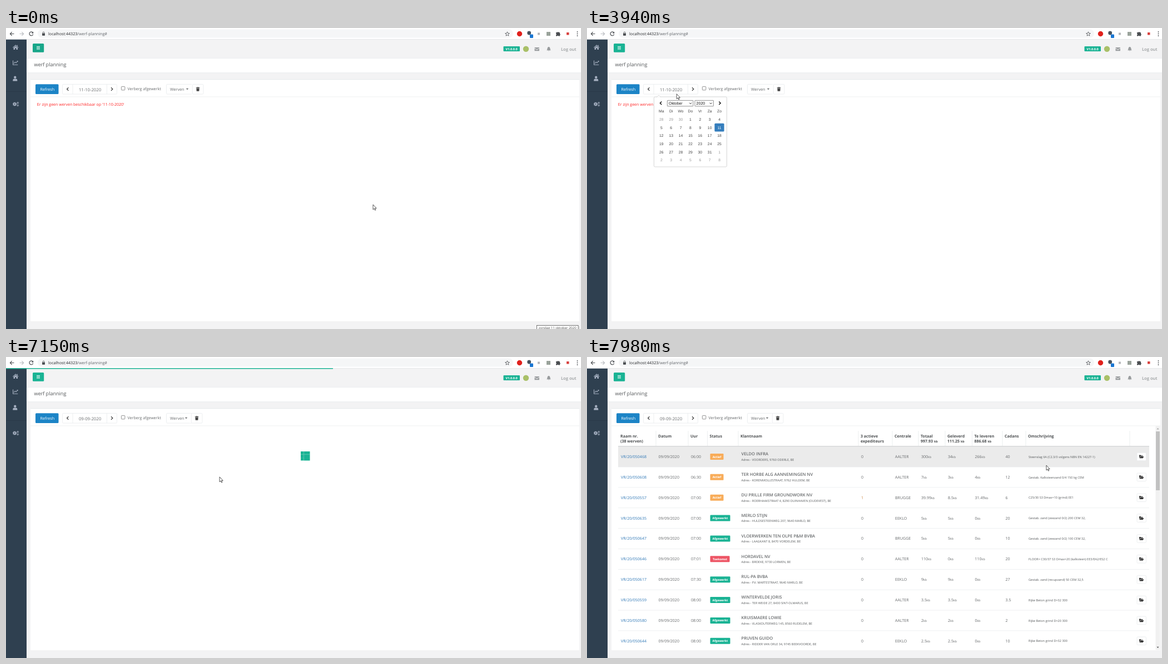
An HTML page that plays this animation: 1034 px wide and 542 px high, repeating every 8 s.

```html
<!DOCTYPE html>
<html lang="nl">
<head>
<meta charset="utf-8">
<title>werf planning</title>
<style>
html, body { margin: 0; width: 100%; height: 100%; overflow: hidden; background: #f3f3f4 }
svg { display: block; width: 1034px; height: 542px; font-family: "Open Sans", sans-serif; text-rendering: geometricPrecision }
.arial { font-family: "Liberation Sans", Arial, sans-serif }
</style>
</head>
<body>
<svg id="stage" viewBox="0 0 1034 542"></svg>
<script>
const LOOP = 8000, OPEN = 3510, PREV = 4680, PICK = 5760, SPIN = 5804, LOADED = 7250;
const GREEN = '#1ab394', LINE = '#e7eaec', GRAY = '#676a6c';
const ROW_TOP = 161.2, ROW_H = 36.86;

const text = (x, y, s, size = 7.05, fill = GRAY, more = '') =>
  `<text x="${x}" y="${y}" font-size="${size}" fill="${fill}" ${more}>${s}</text>`;
const rect = (x, y, w, h, fill, more = '') =>
  `<rect x="${x}" y="${y}" width="${w}" height="${h}" fill="${fill}" ${more}/>`;
const path = (d, fill, more = '') => `<path d="${d}" fill="${fill}" ${more}/>`;
const line = (d, stroke, width = 1) => path(d, 'none', `stroke="${stroke}" stroke-width="${width}"`);
const circle = (x, y, r, fill) => `<circle cx="${x}" cy="${y}" r="${r}" fill="${fill}"/>`;
const group = (id, body, more = '') => `<g id="${id}" ${more}>${body}</g>`;
const bordered = (x, y, w, h, color = LINE, rx = 1.5) =>
  rect(x, y, w, h, '#fff', `stroke="${color}" stroke-width=".8" rx="${rx}"`);
const BOLD = 'font-weight="700"', SEMI = 'font-weight="600"', MID = 'text-anchor="middle"';

function browserBar() {
  const dark = '#4a4d51';
  return rect(0, 0, 1034, 20, '#fff') + rect(57, 2.5, 855, 15, '#f5f6f7', 'rx="7.5"') +
    rect(0, 20, 1034, .8, '#e4e5e6') +
    line('M14.5 10.5H7.5M10.7 7.2L7.4 10.5L10.7 13.8', dark, 1.2) +
    line('M24.5 10.5H31.5M28.3 7.2L31.6 10.5L28.3 13.8', '#b9bcc0', 1.2) +
    line('M48 8.1A3.4 3.4 0 1 0 48.7 11.3', dark, 1.2) + path('M49.2 6.4V9.8H45.8Z', dark) +
    rect(65, 9.5, 5, 4.2, dark, 'rx=".6"') + line('M66 9.8V8.5A1.4 1.4 0 0 1 69 8.5V9.8', dark, .8) +
    text(76, 13, '<tspan fill="#26282b">localhost:44323</tspan>/werf-planning#', 7.16, '#606469') +
    line('M901.5 6.8L902.6 9.4L905.4 9.6L903.2 11.4L903.9 14.1L901.5 12.6L899.1 14.1L899.8 11.4L897.6 9.6L900.4 9.4Z', dark, .8) +
    circle(923.5, 10.5, 4.7, '#e0201c') +
    circle(940.7, 9, 3.4, '#46535f') + rect(942, 11.5, 6, 6.5, '#1976d2', 'rx="1"') +
    rect(956, 8.5, 4, 4, '#b5b7ba') + rect(972, 7, 7, 7, '#9aa39b') +
    path('M989 8H991.4A1.4 1.4 0 0 1 994 8H996V10.4A1.4 1.4 0 0 1 996 13V14.6H993.6A1.3 1.3 0 0 0 991.2 14.6H989V12.4A1.3 1.3 0 0 0 989 10Z', dark) +
    rect(1008, 8, 4.5, 4.5, '#d8423f') +
    [7, 10.5, 14].map(y => circle(1027.5, y, .9, dark)).join('');
}

function sidebar() {
  const c = '#a7b1c2';
  const gear = (x, y, r) =>
    `<circle cx="${x}" cy="${y}" r="${r}" fill="none" stroke="${c}" stroke-width="${r}"/>` +
    `<circle cx="${x}" cy="${y}" r="${r * 1.6}" fill="none" stroke="${c}" stroke-width="${r * .6}" stroke-dasharray="${r * .63}"/>`;
  return rect(0, 20.8, 37, 522, '#2f4050') + rect(0, 114, 37, .8, '#283746') +
    path('M12 35L17.3 30.3L22.6 35L21.9 35.7L17.3 31.7L12.7 35.7ZM13.6 35.7L17.3 32.5L21 35.7V39H18.5V36.3H16.1V39H13.6ZM19.8 30.8H21V33L19.8 32Z', c) +
    line('M12.6 58.5V66.3H21.3M14 63.8L16.3 61.2L18 62.8L20.8 59.8', c, 1.1) +
    path('M19.2 58.9H21.5V61.2Z', c) +
    circle(16.3, 88.8, 2.2, c) + path('M12.3 95.6V94Q12.3 91.6 14.8 91.6H17.8Q20.3 91.6 20.3 94V95.6Z', c) +
    gear(15.6, 137, 1.9) + gear(21.2, 134.8, 1) + gear(21.2, 139.4, 1);
}

function page() {
  const c = '#999c9e';
  return rect(0, 20, 1034, 522, '#f3f3f4') + browserBar() + sidebar() +
    `<rect id="menu" x="48" y="28" width="20.2" height="15.8" rx="1.5"/>` +
    line('M55 33.6H61M55 35.8H61M55 38H61', '#fff', 1) +
    rect(894.5, 33, 29.5, 9, GREEN, 'rx="1"') + text(909.2, 39.6, 'V1.0.0.0', 5.6, '#fff', BOLD + MID) +
    circle(935, 37.7, 5.2, '#a9c068') +
    path('M950.5 35H959V36L954.7 38.6L950.5 36ZM950.5 37L954.7 39.6L959 37V41.2H950.5Z', c) +
    path('M976 33.8Q973.4 34.6 973.4 37.2Q973.4 39 972.3 40.2H979.7Q978.6 39 978.6 37.2Q978.6 34.6 976 33.8ZM974.9 40.8H977.1Q976 42.3 974.9 40.8Z', c) +
    text(998, 40.7, 'Log out', 7.6, c, SEMI) +
    rect(37, 54.3, 997, 26.3, '#fff') + rect(37, 54, 997, .7, LINE) + rect(37, 80.4, 997, .8, LINE) +
    text(50.4, 69, 'werf planning', 9.05, '#55585a') +
    rect(44, 92, 987, 436, '#fff') + rect(44, 92, 987, 1.2, LINE) + rect(44, 123.6, 987, .7, LINE) +
    rect(53, 101.3, 41.5, 17.8, '#1c84c6', 'rx="1.5"') + text(74.3, 112.8, 'Refresh', 7.2, '#fff', MID) +
    bordered(101.4, 101.4, 98, 17.6) + line('M120 101V119M181.4 101V119', LINE, .8) +
    line('M112.4 107.2L109.6 110L112.4 112.8M189 107.2L191.8 110L189 112.8', '#333', 1.2) +
    `<text id="date" x="151" y="114.2" font-size="7.7" fill="${GRAY}" text-anchor="middle"></text>` +
    bordered(207.4, 105.4, 6.4, 6.4, '#767676', 1) + text(218.5, 112.4, 'Verberg afgewerkt') +
    bordered(288.5, 101.4, 46, 17.6) + text(295, 112.8, 'Werven', 7.2);
}

// The caret, divider and bin after "Werven" shift left once the list is refreshed.
function binButton() {
  return rect(332, 101.8, 3.6, 16.8, '#fff') + bordered(335.3, 101.4, 19.6, 17.6) +
    path('M323.8 108.8H328.2L326 111.2Z', GRAY) +
    path('M341.8 107H344L344.4 106.3H346L346.4 107H348.2V108H341.8ZM342.3 108.5H347.7L347.3 113.8H342.7Z', '#444');
}

const TABLE_ROWS = `
050468|06:00|Actief|VELDO INFRA|VOORDERS, 9760 ODERLE|0|AALTER|300|34|266|40|Steenslag IIA (C2.3/3 volgens NBN EN 14227-1)
050608|06:30|Actief|TER HORBE ALG AANNEMINGEN NV|KORENMOLLESTRAAT, 9762 HULDEM|0|AALTER|7|3|4|12|Gestab. Kalksteenzand 0/4 150 kg CEM
050557|07:00|Actief|DU PRILLE FIRM GROUNDWORK NV|ROERHAAKSTRAAT 4, 8290 DUINHAVEN (OUDEVEST)|1|BRUGGE|39.99|8.5|31.49|6|C25/30 S3 Dmax=10 (grind) EE1
050635|07:00|Afgewerkt|MERLO STIJN|HULDSESTEENWEG 207, 9640 MARLO|0|EEKLO|5|5|0|20|Gestab. zand (zeezand 0/2) 200 CEM 32,
050647|07:00|Afgewerkt|VLOERWERKEN TEN OLPE P&amp;M BVBA|LAAGKANT 8, 8470 VORDELEM|0|BRUGGE|5|5|0|10|Gestab. zand (zeezand 0/2) 100 CEM 32,
050646|07:01|Toekomst|HORDAVEL NV|BROEKE, 9730 LORMEN|0|AALTER|110|0|110|20|FLOOR+ C30/37 S3 Dmax=20 (kalksteen) EE3/EA2/ES2 C
050617|07:30|Afgewerkt|RUL-PA BVBA|P.V. MARTESTRAAT, 9640 MARLO|0|EEKLO|9|9|0|27|Gestab. zand (recupzand) 50 CEM 32,5
050559|08:00|Afgewerkt|WINTERVELDE JORIS|TER WEIDE 27, 8430 SINT-OLMARUS|0|AALTER|3.5|3.5|0|3.5|Rijke Beton grind D=32 300
050580|08:00|Afgewerkt|KRUISMAERE LOWIE|VLASKOUTERWEG 145, 8560 RUDELEM|0|AALTER|2|2|0|2|Rijke Beton grind D=20 300
050644|08:00|Afgewerkt|PRUVEN GUIDO|RIDDER VAN ORLE 34, 9745 BEEKVOORDE|0|EEKLO|2.5|2.5|0|10|Rijke Beton grind D=32 300`
  .trim().split('\n').map(row => row.split('|'));

const BADGES = { Actief: ['#f8ac59', 24], Afgewerkt: [GREEN, 36], Toekomst: ['#ed5565', 35] };
const kb = '<tspan font-size="5.4">kb</tspan>';

function tableRow([nr, time, status, name, address, senders, plant, total, done, left, pace, note], i) {
  const mid = ROW_TOP + ROW_H * i + 18.3, base = mid + 2.5;
  const [color, width] = BADGES[status];
  const cells = [[128.5, '09/09/2020'], [187, time], [554, plant], [601, total + kb], [649, done + kb], [697.5, left + kb], [752.5, pace]];
  return rect(56, ROW_TOP + ROW_H * (i + 1) - .4, 955, .7, LINE) +
    text(61, base, 'VR/20/' + nr, 7.05, '#337ab7') +
    cells.map(([x, s]) => text(x, base, s)).join('') +
    rect(221.5, mid - 5.5, width, 11, color, 'rx="1.2"') +
    text(221.5 + width / 2, mid + 2, status, 5.4, '#fff', BOLD + MID) +
    text(277.5, mid - 2.3, name, 7.55, GRAY, SEMI) +
    text(277.5, mid + 7.4, `Adres - ${address}, BE`, 5.5, '#55585a') +
    text(493, base, senders, 7.05, senders > 0 ? '#c9803a' : GRAY) +
    text(794, mid + 2.2, note, 5.55, '#55585a') +
    bordered(989, mid - 7.3, 16.4, 14.6) +
    path(`M993 ${mid + 2.4}v-5.4h2.6l.8 .9h3.2v1.4h-4.8zM993.5 ${mid + 2.8}l1.7 -3h6.2l-1.7 3z`, '#333');
}

function table() {
  const heads = [[60, 'Raam nr.', '(38 werven)'], [128, 'Datum'], [186, 'Uur'], [220.5, 'Status'], [276, 'Klantnaam'],
    [492, '3 actieve', 'expediteurs'], [553, 'Centrale'], [600, 'Totaal', '997.93 ' + kb], [648, 'Geleverd', '111.25 ' + kb],
    [696.5, 'Te leveren', '886.68 ' + kb], [751, 'Cadans'], [793, 'Omschrijving'], [980, '']];
  return `<rect id="hover" x="56" width="955" height="${ROW_H}" fill="#ebebeb"/>` +
    heads.map(([x, a, b = ''], i) => text(x, 144.6, a, 7.05, '#4c4f51', BOLD) + text(x, 154, b, 7.05, '#4c4f51', BOLD) +
      (i ? rect(x - 4.4, 133, .8, 27, LINE) : '')).join('') +
    rect(56, 160, 955, 1.5, '#d6d8d9') +
    TABLE_ROWS.map(tableRow).join('') +
    rect(44, 528, 990, 14, '#f3f3f4') +
    rect(1022.5, 124.3, 8, 403, '#f1f1f1') + rect(1023, 134, 7, 106, '#c1c1c1') +
    path('M1024.5 130.3H1028.5L1026.5 128Z', '#a3a3a3') + path('M1024.5 521.8H1028.5L1026.5 524Z', '#505050');
}

const CELL_X = 133.8, CELL_Y = 164.5, CELL_W = 17.37, CELL_H = 14.65;

function month(name, index, lead) {
  let out = text(147, 137.8, name, 6.95, '#111');
  for (let i = 0; i < 42; i++) {
    const day = new Date(2020, index, 1 - lead + i);
    const x = CELL_X + i % 7 * CELL_W, y = CELL_Y + Math.floor(i / 7) * CELL_H;
    const inside = day.getMonth() === index, active = inside && index === 9 && day.getDate() === 11;
    if (active) out += rect(x - 8.6, y - 7.3, 17.2, 14.6, '#357ebd', 'rx="1.5"');
    out += text(x, y + 2.4, day.getDate(), 6.8, active ? '#fff' : inside ? '#444' : '#999', MID);
  }
  return out;
}

function calendar() {
  const select = (x, w) => bordered(x, 130.4, w, 10.4, '#767676', .5) +
    line(`M${x + w - 6.6} 134.7l1.9 2l1.9 -2`, '#222', 1);
  return bordered(120.4, 124, 131, 126, '#ccc', 2) +
    path('M125.4 124.4L129 121L132.6 124.4', '#fff', 'stroke="#ccc" stroke-width=".7"') +
    rect(125, 128, 16, 14.2, '#eee', 'id="prevHover" rx="1.5"') +
    rect(0, 0, 17.2, 14.6, '#eee', 'id="dayHover" rx="1.5"') +
    line('M134.2 132.4L131.4 135.2L134.2 138M237.4 132.4L240.2 135.2L237.4 138', '#111', 1.4) +
    select(144.4, 46.4) + select(194, 33.4) + text(196.6, 137.8, '2020', 7, '#111') +
    'Ma Di Wo Do Vr Za Zo'.split(' ').map((d, i) => text(CELL_X + i * CELL_W, 152.2, d, 6.8, '#444', MID)).join('') +
    group('october', month('Oktober', 9, 3)) + group('september', month('September', 8, 1));
}

const INK = 'stroke="#222" stroke-width=".75" stroke-linejoin="round"';
const cursors = group('arrow', path('M0 0V9L2.1 7.1L3.5 10.2L4.9 9.6L3.5 6.6H6.2Z', '#fff', INK)) +
  group('beam', line('M-1.8 -4.6Q0 -4.6 0 -3.6Q0 -4.6 1.8 -4.6M0 -3.6V3.6M-1.8 4.6Q0 4.6 0 3.6Q0 4.6 1.8 4.6', '#222', .8)) +
  group('hand', path('M-.8 .8Q0 -.6 .9 .8V4.6L2.3 4.4L3.8 4.9L5.2 5.4Q6 5.8 5.9 7L5.4 10.2L4.7 12H.1L-1.8 9.2L-3 7.2Q-2.6 5.9 -.8 7.6Z', '#fff', INK));

document.getElementById('stage').innerHTML = page() + group('bin', binButton()) +
  group('empty', text(55.8, 139.8, "Er zijn geen werven beschikbaar op '11-10-2020'", 7.03, '#f22')) +
  group('tip', rect(954.5, 535.5, 74.5, 10, '#fff', 'stroke="#666" stroke-width=".9"') + rect(1029.5, 537, 1.5, 6, '#c4c4c4') +
    text(957.8, 542.4, 'zondag 11 oktober 2020', 6.03, '#555')) +
  group('table', table()) +
  group('spinner', '<rect/>'.repeat(9), `fill="${GREEN}"`) +
  rect(0, 20, 0, 1.5, GREEN, 'id="bar"') +
  group('calendar', calendar(), 'class="arial"') + group('cursor', cursors);

const $ = id => document.getElementById(id);
const show = (id, on) => { $(id).style.display = on ? '' : 'none'; };
const place = (el, attrs) => { for (const k in attrs) el.setAttribute(k, attrs[k]); };
const clamp = v => Math.min(1, Math.max(0, v));
const smooth = v => v * v * (3 - 2 * v);

// Pointer stops: time, x, y
const PATH = [[70, 660, 318], [330, 575, 270], [500, 575, 270], [1180, 501, 237], [1350, 501, 237], [1510, 475, 229],
  [1930, 475, 229], [2800, 169, 130], [2880, 153, 117], [3050, 153, 117], [3330, 165, 116], [3860, 165, 116],
  [4520, 134, 138], [4850, 134, 138], [4930, 138, 142], [5510, 168, 183], [5760, 169, 183], [6510, 169, 183],
  [6800, 225, 200], [7150, 383, 216], [7420, 660, 186], [7980, 826, 195]];

function pointer(t) {
  const i = PATH.findIndex(p => p[0] > t);
  if (i === 0) return PATH[0].slice(1);
  if (i < 0) return PATH[PATH.length - 1].slice(1);
  const [t0, x0, y0] = PATH[i - 1], [t1, x1, y1] = PATH[i], k = (t - t0) / (t1 - t0);
  return [x0 + (x1 - x0) * k, y0 + (y1 - y0) * k];
}

function cubeScale(ms) {
  if (ms < 0) return 1;
  const p = ms / 1300 % 1;
  return p < .35 ? 1 - smooth(p / .35) : p < .7 ? smooth((p - .35) / .35) : 1;
}

function draw(t) {
  const [x, y] = pointer(t), picked = t >= PICK, loaded = t >= LOADED;
  $('date').textContent = picked ? '09-09-2020' : '11-10-2020';
  place($('menu'), { fill: t < OPEN ? '#18a689' : GREEN });
  place($('bin'), { transform: `translate(${picked ? -2 : 0})` });
  show('empty', !picked);
  show('tip', t < 3130);

  show('calendar', t >= OPEN && !picked);
  show('october', t < PREV);
  show('september', t >= PREV);
  show('prevHover', t > 4440 && t < 5010);
  const overDays = t > 5010 && y > CELL_Y - 7;
  show('dayHover', overDays);
  if (overDays) place($('dayHover'), {
    x: CELL_X - 8.6 + Math.round((x - CELL_X) / CELL_W) * CELL_W,
    y: CELL_Y - 7.3 + Math.round((y - CELL_Y) / CELL_H) * CELL_H
  });

  show('spinner', picked && !loaded);
  [...$('spinner').children].forEach((cube, i) => {
    const col = i % 3, row = Math.floor(i / 3);
    const size = 5.5 * cubeScale(t - SPIN - 100 * (col + 2 - row));
    place(cube, { x: 532.75 + col * 5.5 - size / 2, y: 172.75 + row * 5.5 - size / 2, width: size, height: size });
  });
  const grow = clamp((t - 6200) / 950);
  place($('bar'), { width: loaded ? 0 : 588 * grow * (2 - grow) });

  show('table', loaded);
  place($('hover'), { y: ROW_TOP + (t < 7500 ? ROW_H : 0) });

  place($('cursor'), { transform: `translate(${x} ${y})` });
  const beam = t >= 3130 && t < 3940, hand = t >= 4440 && !picked;
  show('beam', beam);
  show('hand', hand);
  show('arrow', !beam && !hand);
}

const start = performance.now();
function tick() {
  draw((performance.now() - start) % LOOP);
  requestAnimationFrame(tick);
}
tick();
</script>
</body>
</html>
```
